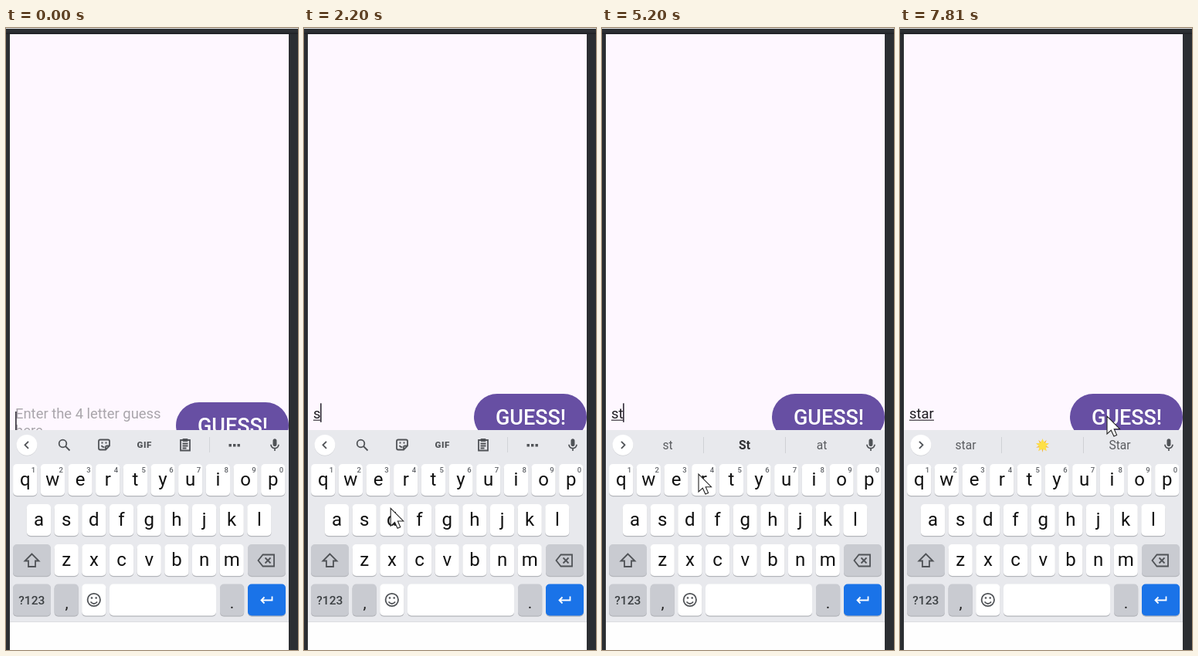
An HTML page that plays this animation: 378 px wide and 806 px high, repeating every 8 s.

```html
<!DOCTYPE html>
<html lang="en">
<head>
<meta charset="utf-8">
<title>Word guess keyboard</title>
<style>
  html, body { margin: 0; width: 100%; height: 100%; overflow: hidden; background: #2b2e32; }
  svg { display: block; width: 100vw; height: 100vh; font-family: Roboto, sans-serif; }
  .mid { text-anchor: middle; }
  .key { font-size: 24px; fill: #111; }
  .hint { font-size: 9.5px; font-weight: 500; fill: #606368; }
  .field { font-size: 18.4px; }
  .word { font-size: 15.6px; fill: #5a5c60; }
  .bold { font-weight: 700; fill: #303134; }
  .line { fill: none; stroke: #505357; stroke-width: 1.8; }
  .ink { fill: #505357; }
</style>
</head>
<body>
<svg viewBox="0 0 378 806">
  <defs>
    <clipPath id="screen"><rect x="5" y="8" width="361" height="513"/></clipPath>
    <filter id="shade" x="-20%" y="-10%" width="140%" height="120%">
      <feDropShadow dx="0" dy="1" stdDeviation="1.2" flood-opacity=".35"/>
    </filter>
  </defs>
  <rect width="378" height="806" fill="#2b2e32"/>
  <rect width="378" height="1" fill="#e6e7e8"/>
  <rect y="6" width="378" height="2" fill="#222428"/>
  <rect x="5" y="8" width="361" height="513" fill="#fef7ff"/>

  <g clip-path="url(#screen)">
    <g id="prompt" class="field" fill="#a9a5ab">
      <text x="12" y="506">Enter the 4 letter guess</text>
      <text x="12" y="527.5">here</text>
    </g>
    <text id="typed" class="field" x="12" y="506" fill="#1d1b20"></text>
    <rect id="underline" x="12" y="507.6" height="1.2" fill="#3a363e"/>
    <rect id="caret" width="1.7" height="24.5" fill="#3c3742"/>
    <g id="button">
      <rect x="220" width="146" height="60" rx="30" fill="#674fa3"/>
      <text class="mid" x="293.5" y="39.5" font-size="27" font-weight="500" fill="#fff">GUESS!</text>
    </g>
  </g>

  <rect x="5" y="521" width="361" height="249" fill="#e8e9ed"/>
  <rect x="5" y="769" width="361" height="1" fill="#dcdde1"/>
  <rect x="5" y="770" width="361" height="36" fill="#fefefe"/>

  <g id="tools">
    <circle class="line" cx="73.5" cy="538.5" r="4.8"/>
    <path class="line" d="M77 542l5.5 5.5"/>
    <path class="line" stroke-width="1.6" d="M122 533.5h10a2 2 0 0 1 2 2v6l-5 5h-7a2 2 0 0 1-2-2v-9a2 2 0 0 1 2-2zM133.5 541.5h-3a1.5 1.5 0 0 0-1.500 1.500v3M123.500 541q1.500 2.500 4 2"/>
    <path class="ink" d="M123.500 536.500h2v2h-2zM128.500 536.500h2v2h-2z"/>
    <text class="mid ink" x="179.300" y="544" font-size="11.500" font-weight="900" letter-spacing=".6">GIF</text>
    <path class="line" stroke-width="1.600" d="M226 534h12v13.500h-12zM228.500 538.500h7M228.500 541.500h7M228.500 544.500h5"/>
    <rect class="ink" x="228.500" y="532" width="7" height="4" rx="1"/>
    <path d="M263.500 530v20" stroke="#d2d4d8"/>
    <path class="ink" d="M288.500 539h3.400v3.400h-3.400zM294 539h3.400v3.400h-3.400zM299.500 539h3.400v3.400h-3.400z"/>
  </g>
  <g id="words">
    <path d="M131.500 530v21M237.500 530v21" stroke="#cfd1d5"/>
    <text class="word mid" x="85" y="546"></text>
    <text class="word mid" x="184.500" y="546"></text>
    <text class="word mid" x="284.500" y="546"></text>
    <g id="star" transform="translate(184.500 541)"></g>
  </g>
  <circle cx="27" cy="541" r="13.400" fill="#cfd1d5"/>
  <circle cx="27" cy="540.300" r="13.400" fill="#fff"/>
  <path id="chevron" class="line" d="M2 -4.500L-2.500 0L2 4.500"/>
  <path class="ink" transform="translate(338 530.500) scale(.83)" d="M12 14c1.660 0 3-1.340 3-3V5c0-1.660-1.340-3-3-3S9 3.340 9 5v6c0 1.660 1.340 3 3 3zm5-3c0 2.760-2.240 5-5 5s-5-2.240-5-5H5c0 3.530 2.610 6.430 6 6.920V21h2v-3.080c3.390-.49 6-3.390 6-6.920h-2z"/>

  <g id="keys"></g>
  <g>
    <path class="line" d="M33.500 681.500l-9 9h4.500v7.500h9v-7.500h4.500z"/>
    <path class="line" d="M332.500 682.500h14.500v15h-14.500l-6-7.500zM335.500 686.500l7 7M342.500 686.500l-7 7"/>
    <circle class="line" cx="113.800" cy="741" r="8.200" stroke-width="1.600"/>
    <path class="line" d="M109.500 743.500q4.300 5 8.600 0"/>
    <circle class="ink" cx="111" cy="738.500" r="1.300"/>
    <circle class="ink" cx="116.700" cy="738.500" r="1.300"/>
    <path d="M344.500 736.500v5h-14M334.500 737.500l-4 4 4 4" fill="none" stroke="#fff" stroke-width="1.800"/>
    <text class="mid" x="33.300" y="747" font-size="15.500" font-weight="500" fill="#3c4043">?123</text>
    <text class="mid" x="78.500" y="752" font-size="21" fill="#222">,</text>
    <text class="mid" x="292.500" y="752" font-size="21" fill="#222">.</text>
  </g>

  <g id="popup">
    <rect x="-18.200" width="36.400" height="104" rx="4" fill="#c8cace" filter="url(#shade)"/>
    <text class="key mid" y="34"></text>
    <path d="M7 43h1.600M9.700 43h1.600M12.400 43h1.600" stroke="#333" stroke-width="1.400"/>
  </g>
  <g id="mouse">
    <circle id="press" r="18" fill="#e9e64a" fill-opacity=".8"/>
    <path d="M0 0V23L5.300 18.200L8.900 26L12.600 24.400L9.200 16.700H16.500Z" fill="#fff" stroke="#222" stroke-width="1.100"/>
  </g>
</svg>
<script>
const $ = id => document.getElementById(id);
const LOOP = 8000, PITCH = 35.67;

// Keyboard
let keys = "";
function addKey(x, y, w, fill = "#fff") {
  const r = c => `width="${w}" height="41" rx="5" fill="${c}"/>`;
  keys += `<rect x="${x}" y="${y + 1.2}" ${r("#b4b6bb")}<rect x="${x}" y="${y}" ${r(fill)}`;
}
[["qwertyuiop", 24.7, 565], ["asdfghjkl", 42.5, 617], ["zxcvbnm", 78.2, 669]].forEach(([row, x0, y], n) => {
  [...row].forEach((c, i) => {
    const x = x0 + i * PITCH;
    addKey(x - 15.6, y, 31.2);
    keys += `<text class="key mid" x="${x}" y="${y + 28.3}">${c}</text>`;
    if (!n) keys += `<text class="hint mid" x="${x + 10.8}" y="${y + 10.5}">${(i + 1) % 10}</text>`;
  });
});
const GREY = "#c9cbd1";
addKey(9, 669, 49, GREY);
addKey(313, 669, 49, GREY);
addKey(9, 720.5, 49, GREY);
addKey(62.6, 720.5, 31.2, GREY);
addKey(98.2, 720.5, 31.2);
addKey(134, 720.5, 138);
addKey(277, 720.5, 31.2, GREY);
addKey(313, 720.5, 49, "#1a73e8");
$("keys").innerHTML = keys;

// Glowing star
const starPath = (n, outer, inner) => Array.from({ length: n * 2 }, (_, i) => {
  const a = i * Math.PI / n - Math.PI / 2, r = i % 2 ? inner : outer;
  return [r * Math.cos(a), r * Math.sin(a)].map(v => v.toFixed(2));
}).join(" ");
$("star").innerHTML = `<polygon points="${starPath(10, 9, 4)}" fill="#f6b73c"/>
  <polygon points="${starPath(5, 8.4, 4.4)}" fill="#fde047"/>`;

// Timeline: [time, ...values]
const path = [
  [330, 303, 776], [1170, 81, 637], [1430, 80, 637], [1630, 80, 645], [1950, 80, 645],
  [2550, 165, 585], [3000, 165, 584], [3570, 41, 638], [4500, 41, 638],
  [5200, 125, 578], [5270, 125, 578], [5590, 41, 637], [5950, 41, 637], [6080, 43, 633],
  [6140, 43, 633], [6460, 131, 586], [7320, 131, 587], [7670, 259, 508], [7810, 268, 503]
];
const typing = [[0, "", 12], [1830, "s", 21], [3070, "st", 27], [5900, "sta", 37.4], [7170, "star", 43]];
const blinks = [[0, 1], [130, 0], [630, 1], [1170, 0], [1830, 1], [2330, 0], [2830, 1], [3570, 0],
  [4100, 1], [4600, 0], [5100, 1], [5620, 0], [5900, 1], [6420, 0], [6920, 1], [7670, 0]];
const hints = [[0, "s", "some", "so"], [3200, "st", "St", "at"], [6040, "sta", "star", "start"], [7300, "star", "", "Star"]];
const presses = [[1630, 1900, "s", 78.2, 555], [2750, 3020, "t", 167.8, 503],
  [5680, 5950, "a", 42.5, 555], [6990, 7240, "r", 131.7, 503]];

const at = (list, t) => list.filter(k => k[0] <= t).pop();
const clamp = v => Math.min(1, Math.max(0, v));
const smooth = v => v * v * (3 - 2 * v);
const show = (el, on) => el.setAttribute("visibility", on ? "visible" : "hidden");
const move = (el, x, y, more = "") => el.setAttribute("transform", `translate(${x} ${y})${more}`);
const labels = $("words").querySelectorAll("text");
const popLabel = $("popup").querySelector("text");

function draw(t) {
  const [, text, caretX] = at(typing, t);
  $("typed").textContent = text;
  $("underline").setAttribute("width", text ? caretX - 11 : 0);
  show($("prompt"), !text);
  move($("caret"), caretX, text ? 486.3 : 497);
  show($("caret"), at(blinks, t)[1]);
  move($("button"), 0, text ? 474 : 485);

  const swap = smooth(clamp((t - 2340) / 210));
  $("tools").setAttribute("opacity", 1 - swap);
  $("words").setAttribute("opacity", swap);
  move($("chevron"), 27, 540.3, ` rotate(${180 * swap})`);
  const words = at(hints, t);
  labels.forEach((el, i) => el.textContent = words[i + 1]);
  labels[1].classList.toggle("bold", t >= 3200);
  $("star").setAttribute("opacity", words[2] ? 0 : 1);

  const hit = presses.find(p => t >= p[0] && t < p[1]);
  show($("popup"), hit);
  show($("press"), hit && t >= hit[0] + 70);
  if (hit) {
    popLabel.textContent = hit[2];
    move($("popup"), hit[3], hit[4]);
  }

  $("mouse").setAttribute("opacity", t < 330 ? 0 : 1);
  const a = at(path, t) || path[0];
  const b = path[path.indexOf(a) + 1] || a;
  const f = a === b ? 0 : smooth(clamp((t - a[0]) / (b[0] - a[0])));
  move($("mouse"), a[1] + (b[1] - a[1]) * f, a[2] + (b[2] - a[2]) * f);
}

const start = performance.now();
function tick() {
  draw((performance.now() - start) % LOOP);
  requestAnimationFrame(tick);
}
tick();
</script>
</body>
</html>
```
